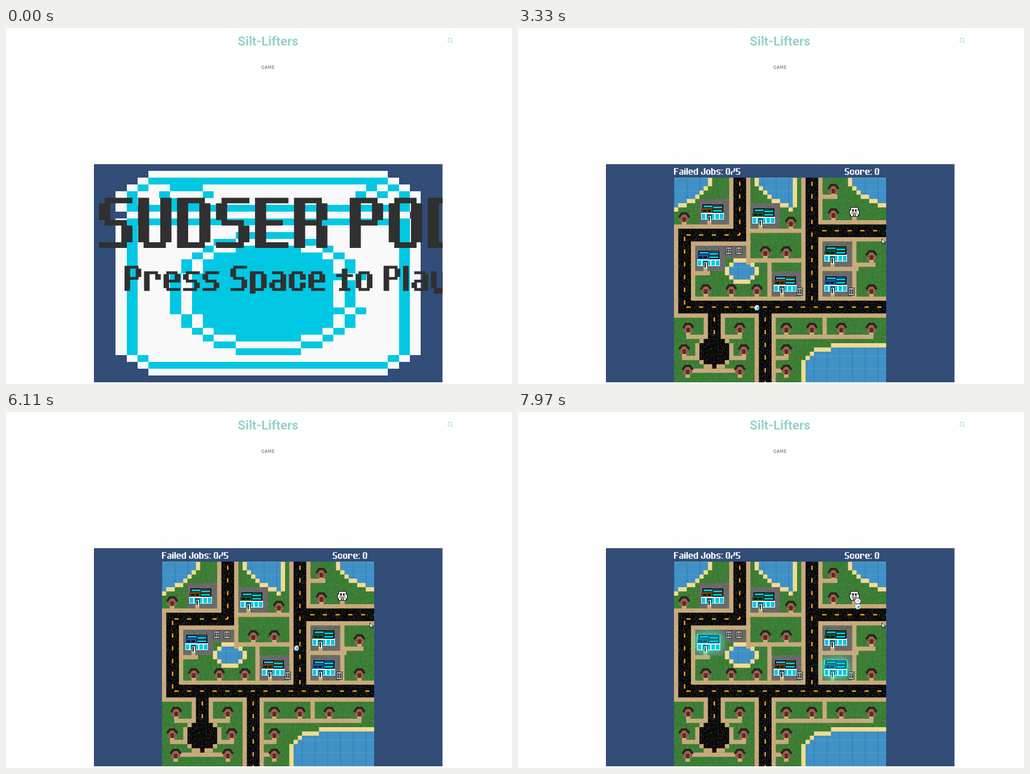
An HTML page with a canvas that plays this animation: 892 px wide and 628 px high, repeating every 8 s.

```html
<!DOCTYPE html>
<html lang="en">
<head>
<meta charset="utf-8">
<style>
  html, body { margin: 0; width: 892px; height: 628px; overflow: hidden; background: #fefefe; }
  canvas { position: absolute; left: 0; top: 0; }
  h1, nav { position: absolute; margin: 0; left: 362px; width: 200px; text-align: center; }
  h1 { top: 7px; font: 700 22.3px/32px Roboto, sans-serif; color: #95d3cd; }
  nav { top: 63px; font: 700 7px/12px Lato, sans-serif; letter-spacing: .8px; color: #777; }
</style>
</head>
<body>
<canvas id="stage" width="892" height="628" aria-label="SUDSER POD. Press Space to Play. Failed Jobs: 0/5 Score: 0"></canvas>
<h1>Silt-Lifters</h1>
<nav>GAME</nav>
<script>
const W = 892, H = 628, LOOP = 8000, STEP = 125, FIRST = 210;
const BLUE = '#314d78', CYAN = '#00c8e3', WHITE = '#f9f9f9', INK = '#303030';
const BROWN = '#6b3f14', GREEN = '#1c5128', NAVY = '#1c54a4', SAND = '#c9aa7c';
const LEFT = 275, TOP = 264.2, UNIT = 7.48;
const ctx = document.getElementById('stage').getContext('2d');

let seed = 7;
const rand = () => (seed = seed * 16807 % 2147483647) / 2147483647;

function layer(paint, w = W, h = H) {
  const c = document.createElement('canvas');
  c.width = w;
  c.height = h;
  paint(c.getContext('2d'));
  return c;
}

function box(g, color, x, y, w, h) {
  g.fillStyle = color;
  g.fillRect(x, y, w, h);
}

// ---- Block lettering: a 3 x 5 set of segments A..O, plus a few extra strokes P..V
const GLYPHS = {
  S: 'BCDHLMN', U: 'ACDFGIJLN', D: 'ABDFGIJLMN', E: 'ABCDGHJMNO', R: 'ABDFGHJLMO',
  P: 'ABDFGHJM', O: 'BDFGIJLN', 0: 'BDFGIJLN', F: 'ABCDGHJM', J: 'CFILJN',
  5: 'ABCDGHLMN', '/': 'CFHJM', r: 'ABDFGJM', e: 'BDFGHIJNO', s: 'BCDHLMN',
  a: 'BFHIJLNO', c: 'BDFGJLN', o: 'BDFGIJLN', p: 'ABDFGIJLMNP', y: 'ACDFGIJLNOQ',
  t: 'NTV', d: 'BCDFGIJLNOS', b: 'ABDFGIJLMNR', l: 'ADGJMR', i: 'ADGJMU', ':': 'AM'
};
const EXTRAS = {
  P: [0, 9, 2, 1], Q: [1, 9, 4, 1], R: [0, 0, 2, 2],
  S: [4, 0, 2, 2], T: [2, 1, 2, 8], U: [0, 0, 2, 1], V: [0, 3, 6, 1]
};
const advance = ch => ' il:'.includes(ch) ? 3 : 7;

function segment(key, rows) {
  if (EXTRAS[key]) return EXTRAS[key];
  const i = key.charCodeAt(0) - 65, col = i % 3, row = i / 3 | 0;
  return [[0, 1, 4][col], rows[row], [2, 4, 2][col], rows[row + 1] - rows[row]];
}

function blockText(g, text, x, y, size, color) {
  g.fillStyle = color;
  g.beginPath();
  for (const ch of text) {
    const rows = /[a-z:]/.test(ch) ? [2, 3, 5, 6, 8, 9] : [0, 1, 4, 5, 8, 9];
    for (const key of GLYPHS[ch] || '') {
      const [sx, sy, w, h] = segment(key, rows);
      g.rect(x + sx * size, y + sy * size, w * size, h * size);
    }
    x += advance(ch) * size;
  }
  g.fill();
}

function panel(g) {
  box(g, BLUE, 155, 240.2, 614.5, 384.8);
  g.beginPath();
  g.rect(155, 240, 614.5, 385);
  g.clip();
}

// ---- Title screen: a washing machine on a 32 x 32 grid
const title = layer(g => {
  panel(g);
  const edgeX = x => Math.round(155 + x * 19.2), edgeY = y => Math.round(240.2 + y * 12.02);
  const put = (color, x, y, w, h) =>
    box(g, color, edgeX(x), edgeY(y), edgeX(x + w) - edgeX(x), edgeY(y + h) - edgeY(y));
  const inset = (color, d, cut) => {
    for (let i = 0; i <= cut; i++)
      put(color, 2 + d + cut - i, 1 + d + i, 28 - 2 * (d + cut - i), 30 - 2 * (d + i));
  };
  const disc = (color, r) => {
    for (let y = 10; y < 28; y++) {
      const half = Math.round(Math.sqrt(Math.max(0, r * r - (y - 18.5) ** 2)));
      put(color, 16 - half, y, 2 * half, 1);
    }
  };

  inset(WHITE, 0, 3);
  inset(CYAN, 1, 2);
  inset(WHITE, 2, 1);
  put(BLUE, 2, 7, 28, 1);
  put(WHITE, 3, 7, 26, 1);
  put(CYAN, 3, 6, 26, 1);
  put(CYAN, 3, 8, 26, 1);
  for (const [x, w] of [[7, 3], [25, 1]]) {
    put(CYAN, x, 3, w, w);
    put(CYAN, x - 1, 4, w + 2, 1);
    put(WHITE, x, 4, w, 1);
  }
  disc(CYAN, 9.15);
  disc(WHITE, 8.15);
  disc(CYAN, 7.15);
  put(WHITE, 22, 17, 3, 4);
  put(CYAN, 23, 17, 1, 4);

  blockText(g, 'SUDSER POD', 164, 299.5, 9.82, INK);
  blockText(g, 'Press Space to Play', 209, 419.5, 4.91, INK);
});

// ---- Town map sprites, in pixels
function texture(base, dots, count) {
  const tile = layer(g => {
    box(g, base, 0, 0, 60, 60);
    for (let i = 0; i < count; i++)
      box(g, dots[i % dots.length], rand() * 60 | 0, rand() * 60 | 0, 1, 1);
  }, 60, 60);
  const pattern = ctx.createPattern(tile, 'repeat');
  pattern.setTransform(new DOMMatrix().scale(1 / UNIT));
  return pattern;
}

function house(g, x, y) {
  box(g, SAND, x - 4, y + 16, 8, 8);
  box(g, '#8d6856', x - 8, y + 5, 16, 13);
  box(g, '#6e4c3e', x - 8, y + 12, 16, 1);
  box(g, '#6d2414', x - 3, y + 10, 6, 8);
  g.strokeStyle = '#33231f';
  g.lineWidth = 4;
  g.beginPath();
  for (const [px, py] of [[-9, 10], [-4, 3], [4, 3], [9, 10]]) g.lineTo(x + px, y + py);
  g.stroke();
}

function building(g, x, y, color, line = '#111') {
  box(g, line, x + 2, y, 37, 16);
  box(g, color, x + 3, y + 1, 35, 13);
  box(g, color, x, y + 8, 21, 7);
  for (const [wx, wy] of [[4, 2], [21, 4], [21, 10]]) {
    box(g, line, x + wx - 1, y + wy - 1, 18, 5);
    box(g, CYAN, x + wx, y + wy, 16, 3);
  }
  for (const wx of [3, 11]) box(g, line, x + wx, y + 10, 6, 3);
  box(g, '#e8fbff', x, y + 15, 40, 12);
  for (let wx = 1; wx < 40; wx += 8) box(g, CYAN, x + wx, y + 17, 6, 9);
  box(g, line, x + 11, y + 18, 7, 9);
  box(g, '#e8fbff', x + 12, y + 20, 5, 11);
  box(g, line, x + 13, y + 21, 2, 9);
}

function machine(g, x, y) {
  box(g, '#222', x, y, 11, 14);
  box(g, '#bbb', x + 1, y + 1, 9, 12);
  for (const dx of [2, 6]) box(g, '#444', x + dx, y + 3, 3, 8);
  box(g, '#999', x + 1, y + 6, 9, 1);
}

function depot(g, x, y) {
  box(g, SAND, x - 4, y + 16, 8, 8);
  for (const [color, d] of [['#111', 0], ['#eee', 1]]) {
    box(g, color, x - 7 + d, y + d, 14 - 2 * d, 17 - 2 * d);
    box(g, color, x - 9 + d, y + 5 + d, 18 - 2 * d, 9 - 2 * d);
  }
  for (const dx of [-4, 1]) box(g, '#222', x + dx, y + 4, 3, 4);
  box(g, '#222', x - 5, y + 10, 10, 1);
  box(g, '#777', x - 3, y + 12, 6, 4);
}

// ---- Town layout, in map units: road centre lines, footpaths, lots, rows of houses
const ROADS = [[15.5, -2.5, 15.5, 13.5], [2.5, 13.5, 15.5, 13.5], [2.5, 13.5, 2.5, 30.5],
  [2.5, 30.5, 52, 30.5], [32.5, -2.5, 32.5, 30.5], [34.5, 12.5, 52, 12.5],
  [21.5, 32.5, 21.5, 50], [9.5, 32.5, 9.5, 38]];
const PATHS = [[17.5, 15, 17.5, 20], [17.5, 12.5, 31, 12.5], [17.5, 19.5, 31, 19.5],
  [22.5, 20, 22.5, 28], [42.5, 15, 42.5, 28], [35, 21.5, 43, 21.5], [35.5, 33, 35.5, 37],
  [35, 4.5, 38, 4.5], [43, 20.5, 47, 20.5], [5, 22.5, 8, 22.5]];
const LOTS = [[6, 5, BROWN], [18, 6, GREEN], [5, 16, NAVY], [35, 15, GREEN], [23, 22, BROWN], [35, 22, NAVY]];
const HOUSES = [[1.3, 37.5], [7, 37.5], [8, 2.4], [9, 27.5], [16, 21.5, 26.5], [17, 46.5],
  [25, 7.5, 13.5, 19.5, 46.5], [34, 3.4, 15.5, 26.5, 32.5, 39.5, 46.5],
  [39.2, 2.4, 16.5, 26.5], [44, 3.2, 15.5, 26.5]];
const place = ([u, v]) => [Math.round(LEFT + u * UNIT), Math.round(TOP + v * UNIT)];
const shop = ([u, v]) => place([u + .47, v + 1.2]);
const homes = HOUSES.flatMap(([v, ...us]) => us.map(u => [u, v]));

const town = layer(g => {
  panel(g);
  blockText(g, 'Failed Jobs: 0/5', 275, 247.3, 1.285, '#fff');
  blockText(g, 'Score: 0', 576, 247.3, 1.29, '#fff');
  g.beginPath();
  g.rect(LEFT, 264, 374, 361);
  g.clip();

  const walk = texture(SAND, ['#c0a072', '#d0b285'], 700);
  const asphalt = texture('#060606', ['#303030', '#1c1c1c', '#444'], 800);
  const gravel = texture('#6a6a6a', ['#5b5b5b', '#7a7a7a'], 1300);

  const lines = (color, width, list) => {
    g.strokeStyle = color;
    g.lineWidth = width;
    g.beginPath();
    for (const [x1, y1, x2, y2] of list) {
      g.moveTo(x1, y1);
      g.lineTo(x2, y2);
    }
    g.stroke();
  };
  // Stepped round shape with a rim one unit wide
  const blob = (fill, rim, cx, cy, rx, ry, power = 2, right = 50) => {
    const inner = new Path2D(), outer = new Path2D();
    for (let y = Math.max(0, Math.ceil(cy - ry)); y < cy + ry && y < 49; y++) {
      const half = rx * (1 - (Math.abs(y + .5 - cy) / ry) ** power);
      const l = Math.round(cx - half), w = Math.min(right, Math.round(cx + half)) - l;
      if (w <= 0) continue;
      inner.rect(l, y, w, 1);
      outer.rect(l - 1, y, w + 2, 1);
      outer.rect(l, y - 1, w, 3);
    }
    g.fillStyle = rim;
    g.fill(outer);
    g.fillStyle = fill;
    g.fill(inner);
    return inner;
  };
  const lake = (...shape) => {
    const shore = blob('#3f91c6', '#f3db91', ...shape);
    g.save();
    g.clip(shore);
    for (let i = 0; i < 50; i += 3) {
      box(g, 'rgba(20,70,110,.3)', i, 0, .13, 49);
      box(g, 'rgba(120,190,220,.35)', 0, i, 50, .13);
    }
    g.restore();
  };

  g.save();
  g.translate(LEFT, TOP);
  g.scale(UNIT, UNIT);
  box(g, texture('#3d7e36', ['#336f2e', '#488c3f'], 1500), 0, -1, 50, 50);
  for (const [u, v] of LOTS) box(g, gravel, u, v, 7, 6);
  box(g, gravel, 12, 16, 5, 3);

  lake(0, 0, 8.3, 7);
  lake(28, 0, 8.2, 7, 2, 28);
  lake(50, 0, 8.3, 6.3);
  lake(16, 22, 3, 2.3);
  lake(50, 49, 19, 9.7, 9);

  // Southern homes reach the nearest street by a driveway
  const drives = homes.filter(([, v]) => v > 33).map(([u, v]) => {
    const y = Math.min(Math.floor(v) + 3.5, 45.5);
    return [u, y, u < 19 ? 9.5 : 23.5, y];
  });
  g.lineCap = 'square';
  lines(walk, 1, PATHS.concat(drives));
  lines(walk, 5, ROADS);
  blob(asphalt, walk, 9.5, 41, 3.9, 3.6, 3);
  lines(asphalt, 3, ROADS);
  g.lineCap = 'butt';
  g.setLineDash([1, 2]);
  g.lineDashOffset = -.4;
  lines('#f5b50f', .3, ROADS);
  g.restore();

  for (const home of homes) house(g, ...place(home));
  for (const lot of LOTS) {
    const [x, y] = shop(lot);
    box(g, SAND, x + 11, y + 29, 7, 7);
    building(g, x, y, lot[2]);
  }
  for (const [x, y] of [[366, 386], [384, 386], [491, 458], [582, 458]]) machine(g, x, y);
  depot(g, 593, 316);
});

// ---- Moving parts
const ROUTE = [[421, 494], [455, 494], [376, 494], [510, 494], [514, 357], [599, 355], [599, 344]];
const START = 3340, SPEED = .118;

// Point after a given distance along the route, and the last x direction.
function travel(distance) {
  let [x, y] = ROUTE[0], dir = 1;
  for (const [nx, ny] of ROUTE.slice(1)) {
    const length = Math.hypot(nx - x, ny - y), f = Math.min(1, distance / length);
    if (distance <= 0) break;
    dir = nx < x ? -1 : 1;
    x += (nx - x) * f;
    y += (ny - y) * f;
    distance -= length;
  }
  return [Math.round(x), Math.round(y), dir];
}

function robot(t) {
  const [x, y, dir] = travel((t - START) * SPEED);
  for (const dx of [-3, 1]) box(ctx, '#0b2a33', x + dx, y + 4, 2, 1);
  box(ctx, '#f2fcff', x - 2, y - 5, 5, 2);
  box(ctx, '#f2fcff', x - 4, y - 3, 8, 5);
  box(ctx, '#8fdcea', x - 3, y + 1, 6, 3);
  box(ctx, '#1d9fb8', dir > 0 ? x : x - 3, y - 2, 3, 3);
  if (t < 7580) return;
  ctx.fillStyle = '#f4f4f4';
  ctx.strokeStyle = '#333';
  ctx.lineWidth = 1;
  ctx.beginPath();
  ctx.ellipse(x, y - 10.5, 5.5, 5, 0, 0, 7);
  ctx.fill();
  ctx.stroke();
  box(ctx, '#999', x - 2, y - 11, 4, 1);
}

function cursor(x, y) {
  ctx.fillStyle = '#fff';
  ctx.strokeStyle = '#000';
  ctx.lineWidth = .8;
  ctx.beginPath();
  for (const [px, py] of [[0, 0], [0, 9], [2, 7.2], [3.3, 10.3], [4.6, 9.7], [3.4, 6.7], [6, 6.5]])
    ctx.lineTo(x + px, y + py);
  ctx.closePath();
  ctx.fill();
  ctx.stroke();
}

function pointer(t) {
  if (t < FIRST) return;
  if (t >= 1080) return cursor(641.5, 371.5);
  const f = (t - FIRST) / 750, a = (1 - f) ** 2, b = 2 * f * (1 - f), c = f * f;
  cursor(640 * a + 584 * b + 605 * c, 470 * a + 410 * b + 349 * c);
}

function glow(t) {
  ctx.save();
  ctx.globalAlpha = Math.min(1, .55 + (t - 7580) / 800);
  for (const lot of LOTS.filter(l => l[2] === NAVY)) {
    const [x, y] = shop(lot);
    ctx.shadowColor = '#3dffa8';
    ctx.shadowBlur = 16;
    box(ctx, '#35e8a0', x - 1, y - 1, 42, 29);
    box(ctx, '#35e8a0', x + 11, y + 26, 8, 6);
    ctx.shadowBlur = 0;
    building(ctx, x, y, '#1a82a8', '#0c5a62');
  }
  ctx.restore();
}

function searchIcon() {
  ctx.strokeStyle = '#95d3cd';
  ctx.lineWidth = 1;
  ctx.beginPath();
  ctx.arc(782.8, 21.3, 3.9, 0, 7);
  ctx.moveTo(785.6, 24.2);
  ctx.lineTo(788.5, 27.2);
  ctx.stroke();
}

function frame(now) {
  const time = now % LOOP;
  const t = time < FIRST ? 0 : FIRST + Math.floor((time - FIRST) / STEP) * STEP;
  const playing = t >= 2200;
  ctx.clearRect(0, 0, W, H);
  searchIcon();
  ctx.drawImage(playing ? town : title, 0, 0);
  if (t >= 7580) glow(t);
  if (playing) robot(t);
  pointer(t);
  requestAnimationFrame(frame);
}
requestAnimationFrame(frame);
</script>
</body>
</html>
```
